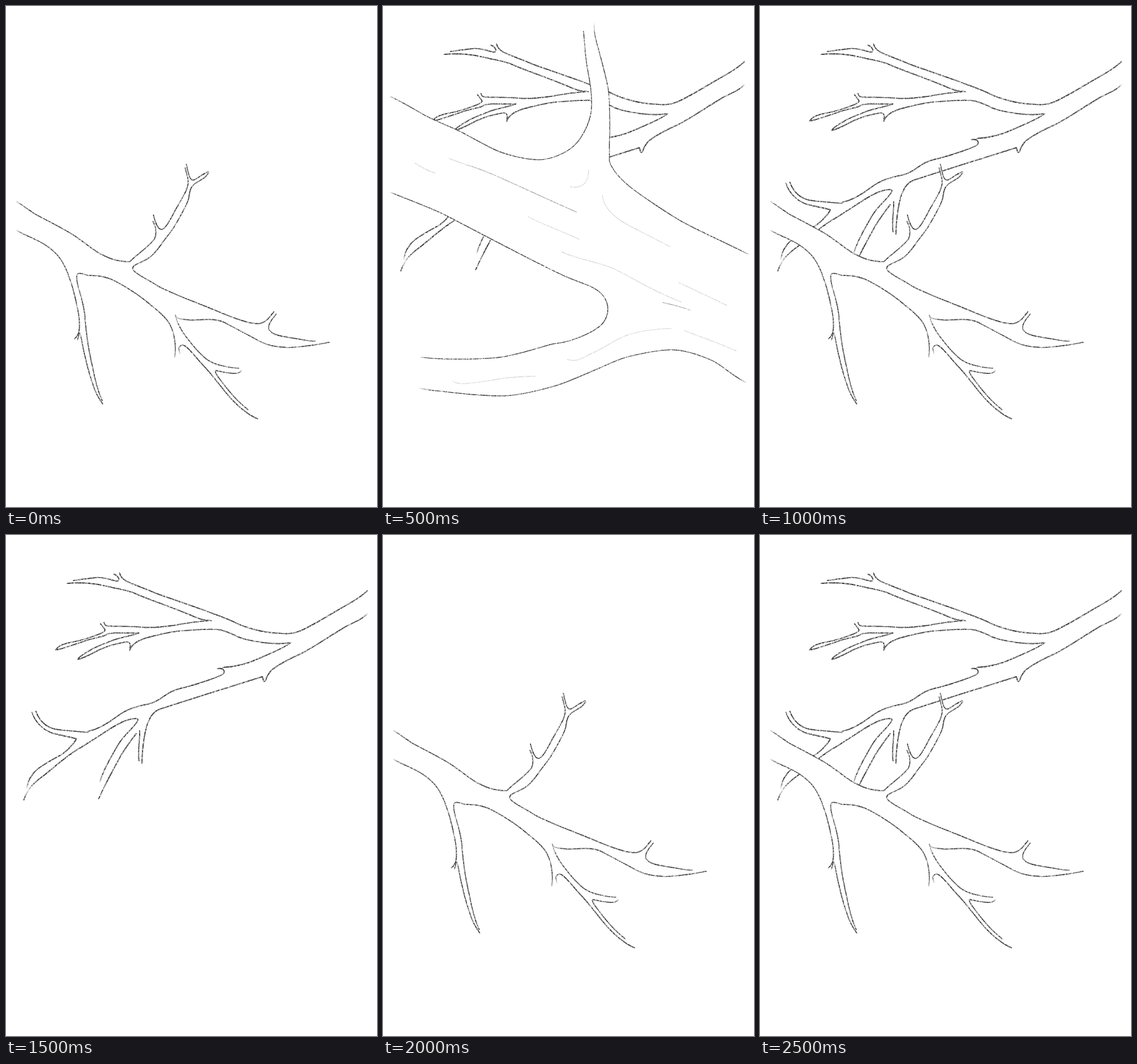
Animation of 644x870 px, one loop 3 s. Source, as an HTML page without scripts:

```html
<!DOCTYPE html>
<html lang="en">
<head>
<meta charset="utf-8">
<title>Branches</title>
<style>
html, body { margin: 0; width: 100%; height: 100%; overflow: hidden; background: #fff; }
svg { display: block; width: 644px; height: 870px; }
.mask { fill: #fff; }
.line { fill: none; stroke: #3a3a3a; stroke-linecap: round; stroke-linejoin: round; filter: url(#pencil); }
.layer { animation: 3s step-end infinite; }
#low { animation-name: low; }
#high { animation-name: high; }
#trunk { animation-name: trunk; }
#low .line { stroke-width: 1.9; }
#high .line { stroke-width: 2.1; }
#trunk .line { stroke-width: 1.6; }
#trunk .mid { stroke: #aaa; }
#trunk .pale { stroke: #d8d8d8; }
@keyframes low {
  0%, 33.33%, 66.66%, 100% { visibility: visible; }
  16.66%, 50% { visibility: hidden; }
}
@keyframes high {
  0%, 66.66%, 100% { visibility: hidden; }
  16.66%, 83.33% { visibility: visible; }
}
@keyframes trunk {
  0%, 33.33%, 100% { visibility: hidden; }
  16.66% { visibility: visible; }
}
</style>
</head>
<body>
<svg viewBox="0 0 644 870">
  <defs>
    <filter id="pencil" filterUnits="userSpaceOnUse" x="0" y="0" width="644" height="870" color-interpolation-filters="sRGB">
      <feTurbulence type="fractalNoise" baseFrequency=".35" numOctaves="2" seed="4"/>
      <feColorMatrix values="0 0 0 0 0  0 0 0 0 0  0 0 0 0 0  2.2 0 0 0 -.35"/>
      <feComposite in="SourceGraphic" operator="in"/>
    </filter>
    <radialGradient id="soft">
      <stop offset="0" stop-color="#fff"/>
      <stop offset="1" stop-color="#fff" stop-opacity="0"/>
    </radialGradient>
    <circle id="fade" r="14" fill="url(#soft)"/>
  </defs>

  <g id="high" class="layer">
    <g class="line">
      <!-- upper fork -->
      <path d="M627 97C610 113 590 122 575 131S530 158 512 166S480 171 465 170S420 163 400 153S365 139 350 133S275 107 260 101S225 87 215 83S199 74 197 66"/>
      <path d="M187 68C195 70 199 80 193 80S170 72 155 74S130 77 117 79"/>
      <path d="M106 84C130 82 155 84 175 89S210 95 225 102S300 130 320 139S345 148 357 149C330 149 305 155 290 157S255 162 235 160S185 159 177 158S172 154 170 152"/>
      <!-- middle fork -->
      <path d="M164 154C168 160 175 164 170 168S135 182 120 185S92 190 86 200C100 197 125 188 140 183S165 178 174 173S205 171 231 170C215 176 197 178 185 183S160 192 150 198S133 206 125 215"/>
      <path d="M125 216C138 213 150 205 165 198S195 188 207 186S215 195 215 200C217 193 222 188 232 183S270 172 285 169S345 163 365 164S400 178 415 181S460 192 494 187C480 198 455 207 440 214S405 229 376 230"/>
      <!-- lower fork -->
      <path d="M367 232C378 230 382 238 376 242S335 258 320 262S292 268 280 276S260 291 245 294S212 302 200 310S165 337 142 341"/>
      <path d="M52 306C56 319 66 330 78 335S110 339 142 343"/>
      <path d="M45 308C50 323 62 337 78 343S108 349 122 354C118 363 104 377 95 382S62 400 53 408S38 428 36 440"/>
      <path d="M31 460C38 439 50 429 65 418S100 387 125 372S180 336 195 328S228 316 229 321S205 348 198 359S166 412 163 430"/>
      <path d="M161 458C170 436 185 410 195 391S214 361 226 345"/>
      <path d="M232 340C233 357 228 374 231 392"/>
      <path d="M236 396C236 374 240 347 244 333S255 306 268 302S315 287 340 279S410 257 445 246C447 250 446 255 449 254S452 244 460 236S490 216 510 207S570 170 590 159S616 148 627 137"/>
    </g>
    <use href="#fade" x="36" y="442"/>
    <use href="#fade" x="163" y="432"/>
    <use href="#fade" x="630" y="135"/>
  </g>

  <g id="low" class="layer">
    <path class="mask" d="M18 339 50 361 100 388 122 401 140 416 165 431 190 442 215 444 220 456 190 478 150 468 125 465 115 487 93 437 80 423 50 405 18 389ZM313 276 322 301 316 312 312 284Z"/>
    <g class="line">
      <path d="M18 339L50 361C70 372 105 389 122 401S153 425 165 431S190 444 215 444"/>
      <path d="M216 443C226 432 250 417 258 404C262 394 260 383 255 374"/>
      <path d="M256 363C259 376 264 388 270 388S285 372 292 358S315 322 316 309S313 292 311 281"/>
      <path d="M313 275C316 288 318 300 323 302S338 293 351 288"/>
      <path d="M352 289C346 301 333 303 325 311S319 330 316 338S294 383 283 396S264 425 250 436S219 448 220 456S245 474 260 484S320 511 345 521S380 536 400 543S435 554 445 550S458 539 465 531"/>
      <path d="M469 535C460 546 452 556 458 564S482 574 500 577S525 582 537 582"/>
      <path d="M561 584C540 588 510 593 490 593S455 590 440 582S395 558 380 550S345 544 335 545S300 545 295 540"/>
      <path d="M294 537C297 551 303 562 313 575S338 606 349 614S382 628 404 629"/>
      <path d="M408 634C402 642 380 636 364 633C361 637 372 649 378 657S401 686 420 701"/>
      <path d="M437 717C418 709 402 694 390 681S361 644 345 627S312 586 305 589S300 597 302 604"/>
      <path d="M293 609C296 590 292 568 285 554S262 528 245 514S205 486 190 478S160 468 148 468S130 462 125 465S125 487 128 497S136 525 137 540S142 590 146 607S156 664 167 685"/>
      <path d="M168 691C156 676 151 658 146 642S135 600 131 579S127 572 124 580"/>
      <path d="M119 578C129 570 128 555 127 543S119 500 114 484S103 450 92 436S65 412 50 405S28 396 18 389"/>
    </g>
    <use href="#fade" x="16" y="338"/>
    <use href="#fade" x="16" y="388"/>
    <use href="#fade" x="302" y="606"/>
    <use href="#fade" x="542" y="580" opacity=".6"/>
    <use href="#fade" x="300" y="543" opacity=".6"/>
    <use href="#fade" x="408" y="627" opacity=".5"/>
  </g>

  <g id="trunk" class="layer">
    <path class="mask" d="M15 158 75 191 100 203 130 216 165 235 200 252 270 267 330 244 350 217 361 185 362 155 356 115 348 44 367 28 374 75 391 145 394 190 393 270 430 315 634 431 630 655 390 500 320 471 200 411 110 364 12 323Z"/>
    <g class="line">
      <path d="M12 157C35 167 58 182 75 191S115 209 130 216S180 244 200 252S250 267 270 267S315 257 330 244S358 205 361 185S361 140 356 115S351 75 348 44"/>
      <path d="M367 28C365 45 370 60 374 75S388 125 391 145S394 215 393 240V270C399 287 415 303 430 315S495 361 520 375S605 416 634 431"/>
      <path d="M12 323C40 335 85 351 110 364S175 398 200 411S295 460 320 471S370 487 382 503S392 536 383 549S345 575 325 581S305 584 290 588S225 609 195 611S110 615 66 610"/>
      <path d="M62 663C78 668 95 668 110 670S180 678 210 677S290 663 310 656S395 620 410 614S475 597 500 597S555 608 572 616S600 638 630 654"/>
    </g>
    <path class="line mid" d="M145 276C165 281 190 292 210 301S300 342 336 358M486 515Q510 520 533 528"/>
    <path class="line pale" d="M56 273Q72 284 90 290M115 265L145 276M252 366C270 376 315 393 340 405M310 427C335 439 375 445 400 456S465 494 518 514M513 480C545 495 570 507 597 520M524 564C555 576 585 586 613 599"/>
    <path class="line pale" d="M320 614C338 619 345 611 365 602S400 581 420 573S470 561 500 560M121 651C128 659 155 655 175 652S220 643 265 643M357 284C357 303 350 318 325 314M381 329C382 347 398 362 410 371S465 400 498 418"/>
    <use href="#fade" x="10" y="155"/>
    <use href="#fade" x="10" y="323"/>
    <use href="#fade" transform="translate(367 28) scale(1.8)"/>
    <use href="#fade" x="637" y="432"/>
    <use href="#fade" x="632" y="655"/>
    <use href="#fade" x="61" y="609"/>
    <use href="#fade" transform="translate(60 662) scale(1.8)"/>
  </g>
</svg>
</body>
</html>
```
